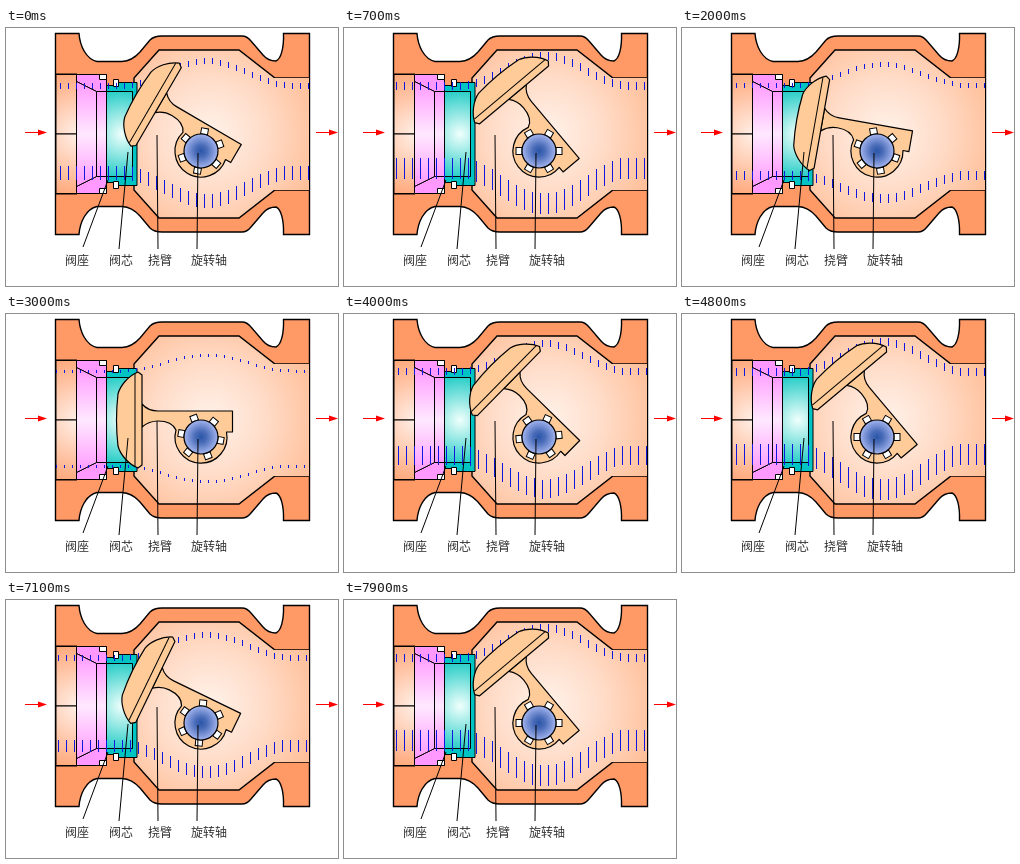
Write an HTML page that moves like this. It is 332 px wide and 258 px high and loops after 8 s.

```html
<!DOCTYPE html>
<html lang="zh">
<head>
<meta charset="utf-8">
<title>Check valve</title>
<style>
  html, body { margin: 0; width: 100%; height: 100%; overflow: hidden; background: #fff; }
  svg { display: block; width: 332px; height: 258px; }
  .line { fill: none; stroke: #000; }
  .part { stroke: #000; }
  .bold { stroke-width: 1.400; }
  .metal { fill: #ffcc99; stroke: #000; stroke-linejoin: round; stroke-width: 1.200; }
  .key { fill: #fff; stroke: #000; }
  .label { font: 300 12px "Noto Sans CJK SC", "Noto Sans CJK", "Noto Serif", serif; fill: #333; }
</style>
</head>
<body>
<svg viewBox="0 0 332 258">
  <defs>
    <radialGradient id="chamber" gradientUnits="userSpaceOnUse" cx="204" cy="106" r="112">
      <stop offset="0" stop-color="#fff2ea"/>
      <stop offset=".5" stop-color="#ffdcc8"/>
      <stop offset="1" stop-color="#ffbf99"/>
    </radialGradient>
    <radialGradient id="inlet" gradientUnits="userSpaceOnUse" cx="72" cy="106" r="62">
      <stop offset="0" stop-color="#fff0e8"/>
      <stop offset="1" stop-color="#ffa97c"/>
    </radialGradient>
    <linearGradient id="bore" x2="0" y2="1">
      <stop offset="0" stop-color="#ff99ff"/>
      <stop offset="1" stop-color="#ffe8ff"/>
    </linearGradient>
    <radialGradient id="throat" gradientUnits="userSpaceOnUse" cx="116" cy="106" r="48">
      <stop offset="0" stop-color="#f0fffc"/>
      <stop offset="1" stop-color="#14c8c2"/>
    </radialGradient>
    <radialGradient id="shaft">
      <stop offset="0" stop-color="#2a56a8"/>
      <stop offset=".35" stop-color="#4a6cb8"/>
      <stop offset="1" stop-color="#a3b4ee"/>
    </radialGradient>
  </defs>

  <!-- upper half of the housing and seat, mirrored below -->
  <g id="half">
    <path class="part bold" fill="#ff9966" d="M49.500 106V5.500H73C74 18 80 31 91 33.500H116Q126 33 134 24L144 12Q148 8 156 8H236Q241 8 245 13L257 27Q262 33 270 33C275 31 278 20 277.500 5.500H303.500V106"/>
    <path class="part bold" fill="url(#chamber)" d="M128 106V50L153 22H233L269 50H303"/>
    <path fill="url(#chamber)" d="M240 50H303V106H128.700Z"/>
    <path class="part" fill="url(#inlet)" stroke="none" d="M50 46H71V106H50Z"/>
    <path class="line" d="M50 46.500H71"/>
    <path class="part" fill="#ff99ff" d="M70.500 46.500H100.500V63.500H90.500L70.500 53.500Z"/>
    <path class="part" fill="url(#bore)" d="M70.500 106V53.500L90.500 63.500V106"/>
    <path class="part" fill="url(#bore)" d="M90.500 106V63.500H100.500V106"/>
    <path class="part" fill="#00c4c4" d="M100.500 106V57.500H112.500V54.500H131V106"/>
    <path class="part" fill="url(#throat)" d="M100.500 106V63.500H126.500V106"/>
    <path class="key" d="M93.500 46.500h7v5h-7zM107.500 51.500h5v7h-5z"/>
  </g>
  <use href="#half" transform="translate(0 212) scale(1 -1)"/>

  <path id="ticks" class="line" style="stroke:#1018e0" shape-rendering="crispEdges"/>

  <g id="valve">
    <path class="metal" d="M136 90Q142 97 152 97H226.500V118H220.500A26 26 0 1 1 170 116Q166 107 152 107Q143 107 136 113Z"/>
    <path class="metal" d="M132 58L136 61V151L132 154C122 150 114 140 112 132Q109 106 112 80C114 72 122 62 132 58Z"/>
    <path class="line" d="M129 60V152"/>
    <g id="keys"></g>
  </g>
  <circle class="part" cx="195" cy="123" r="17" fill="url(#shaft)" stroke-width="1.200"/>

  <path class="line" d="M77 219L102 152M113 221L122 124M152 221L151 107M191 221L192 125"/>
  <g class="label">
    <text x="59" y="236.500">阀座</text>
    <text x="103" y="236.500">阀芯</text>
    <text x="142" y="236.500">挠臂</text>
    <text x="185" y="236.500">旋转轴</text>
  </g>
  <g id="arrow" fill="#f00">
    <path d="M19 104H32V101.500L41 104.500L32 107.500V105H19Z"/>
  </g>
  <use href="#arrow" x="291"/>
</svg>
<script>
const LOOP = 8000, STEP = 100;
// steps of one cycle: opened, starts closing, closed, whole length
const OPENED = 13, CLOSING = 18, CLOSED = 28, CYCLE = 36;
const FIRST = 6, MAX_ANGLE = 50, GAP = 8, DRIFT = 2;

const valve = document.getElementById("valve");
const ticks = document.getElementById("ticks");
const ramp = (v, from, to) => Math.min(1, Math.max(0, (v - from) / (to - from)));
const mix = (a, b, k) => a + (b - a) * k;

document.getElementById("keys").innerHTML = Array.from({ length: 6 }, (_, i) =>
  `<rect class="key" x="212" y="119.500" width="6" height="7" transform="rotate(${i * 60 + 10} 195 123)"/>`
).join("");

// the stream edges bulge out in the middle of the chamber
function bulge(x) {
  const d = Math.min(1, Math.abs(x - 200) / 85);
  return Math.cos(d * Math.PI / 2) ** 2;
}

function tickPath(flow, shift) {
  let d = "";
  for (let x = 50 + shift % GAP; x < 303; x += GAP) {
    const b = bulge(x);
    const mark = (y, size) => {
      d += `M${x + .5} ${Math.round(y - size / 2)}v${Math.round(size)}`;
    };
    mark(mix(57, 58, flow) - b * mix(16, 30, flow), mix(3, 8, flow));
    mark(mix(152, 140, flow) + b * mix(16, 36, flow), mix(3, 21, flow));
  }
  return d;
}

let shown = -1;
function draw(now) {
  const phase = (Math.floor(now % LOOP / STEP) + FIRST) % CYCLE;
  const step = phase >= CLOSED ? 0 : phase;
  if (step === shown) return;
  shown = step;

  const open = 1 - (1 - ramp(step, 0, OPENED)) ** 1.5;
  const close = ramp(step, CLOSING, CLOSED);
  valve.setAttribute("transform", `rotate(${MAX_ANGLE * (open - close)} 195 123)`);
  ticks.setAttribute("d", tickPath(open - close ** 2, step * DRIFT));
}

const begin = performance.now();
function tick() {
  draw(performance.now() - begin);
  requestAnimationFrame(tick);
}
tick();
</script>
</body>
</html>
```
